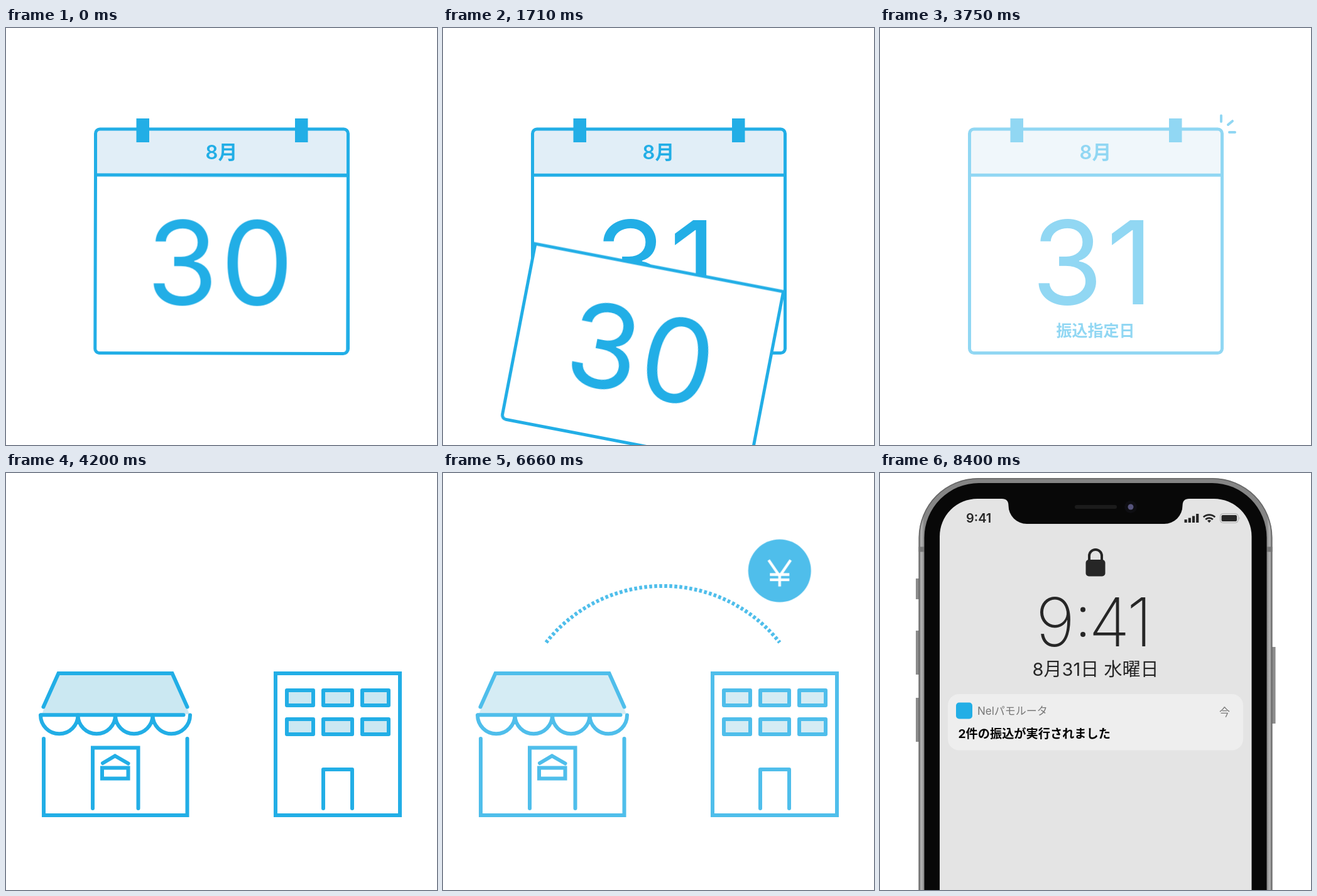
These frames come from a looping animation (686x664 px, 9.9 s). An HTML page:

```html
<!DOCTYPE html>
<html lang="ja">
<head>
<meta charset="utf-8">
<title>振込</title>
<style>
html, body { margin: 0; width: 100%; height: 100%; overflow: hidden; background: #fff; }
svg { display: block; width: 686px; height: 664px; }
text { font-family: Inter, "Noto Sans CJK JP", "Noto Sans CJK", sans-serif; }
.mid { text-anchor: middle; }
.blue { fill: #22aee6; }
.line { fill: none; stroke: #22aee6; stroke-width: 5; }
.thick { stroke-width: 6; stroke-linecap: round; }
.round { stroke-linejoin: round; }
.tint { fill: #cbe8f2; }
.day { font-size: 184px; }
.ink { fill: #262626; }
.note { fill: #777; font-size: 17px; }

/* one shared clock: 1% = 99 ms */
.anim { animation: 9.9s linear infinite; }
#calendar { animation-name: calendar; }
#due { animation-name: due; }
#fall { animation-name: fall; }
#swing { animation-name: swing; transform-origin: 142.5px 234px; }
#town { animation-name: town; }
#trail { animation-name: trail; }
#orbit { animation-name: orbit; transform-origin: 349.5px 442.5px; }
#coin { animation-name: upright; transform-origin: 349.5px 100.5px; }
#phone { animation-name: phone; }
#card { animation-name: card; }

@keyframes calendar {
  0%, 33.333% { opacity: 1; }
  42.424%, 100% { opacity: 0; }
}
@keyframes due {
  0%, 24.242% { opacity: 0; }
  25.758%, 100% { opacity: 1; }
}
@keyframes fall {
  0% { transform: translateY(0); }
  12.121% { transform: translateY(0); animation-timing-function: cubic-bezier(.333, 0, .667, .333); }
  22.424%, 100% { transform: translateY(437px); }
}
@keyframes swing {
  0% { transform: translateX(0) rotate(.15deg); }
  7.576% { transform: translateX(0) rotate(.15deg); animation-timing-function: ease-in-out; }
  9.091% { transform: translateX(4px) rotate(-.8deg); animation-timing-function: cubic-bezier(.4, 0, .6, .75); }
  12.727% { transform: translateX(4.5px) rotate(6.6deg); animation-timing-function: cubic-bezier(.33, .46, .67, .72); }
  18.03% { transform: translateX(4.5px) rotate(11.5deg); }
  20.909% { transform: translateX(4px) rotate(13.4deg); }
  22.424%, 100% { transform: translateX(4px) rotate(14.2deg); }
}
@keyframes town {
  0%, 39.394% { opacity: 0; }
  42.424%, 66.667% { opacity: 1; }
  69.697%, 100% { opacity: 0; }
}
@keyframes trail {
  0%, 48.181% { stroke-dashoffset: 100; }
  48.182%, 52.121% { stroke-dashoffset: 99.5; }
  60.303%, 100% { stroke-dashoffset: 0; }
}
@keyframes orbit {
  0%, 52.423% { transform: rotate(-33deg); opacity: 0; }
  52.424%, 52.727% { transform: rotate(-33deg); opacity: 1; }
  60.606%, 100% { transform: rotate(33deg); opacity: 1; }
}
@keyframes upright {
  0%, 52.727% { transform: rotate(33deg); }
  60.606%, 100% { transform: rotate(-33deg); }
}
@keyframes phone {
  0% { opacity: 0; }
  73.03% { opacity: 0; animation-timing-function: cubic-bezier(.333, .667, .667, 1); }
  78.788%, 100% { opacity: 1; }
}
@keyframes card {
  0%, 81.515% { opacity: 0; }
  84.848%, 100% { opacity: 1; }
}
</style>
</head>
<body>
<svg viewBox="0 0 686 664">
  <defs>
    <path id="arc" d="M164 270A237 237 0 0 1 536 270" pathLength="100"/>
    <mask id="reveal" maskUnits="userSpaceOnUse" x="0" y="0" width="686" height="664">
      <path id="trail" class="anim" d="M164 270A237 237 0 0 1 536 270" pathLength="100"
        fill="none" stroke="#fff" stroke-width="14" stroke-dasharray="100 200"/>
    </mask>
    <rect id="window" x="447" y="346" width="42" height="24"/>
    <rect id="wide" x="505" y="346" width="46" height="24"/>
    <linearGradient id="metal">
      <stop offset="0" stop-color="#777"/>
      <stop offset=".008" stop-color="#b4b4b4"/>
      <stop offset=".016" stop-color="#858585"/>
      <stop offset=".984" stop-color="#858585"/>
      <stop offset=".992" stop-color="#b4b4b4"/>
      <stop offset="1" stop-color="#777"/>
    </linearGradient>
  </defs>

  <g id="calendar" class="anim">
    <rect x="142.5" y="161" width="402" height="356.5" rx="7" fill="#fff"/>
    <path d="M142.5 234V168a7 7 0 0 1 7-7H537.500a7 7 0 0 1 7 7V234Z" fill="#e1eef7"/>
    <rect class="line" x="142.500" y="161" width="402" height="356.5" rx="7"/>
    <path class="line" d="M142.500 234.200H544.500"/>
    <path class="blue" d="M207.500 144h20.500v38h-20.500zM460 144h20.500v38h-20.500z"/>
    <text class="blue mid" x="343" y="209" font-size="31" font-weight="600">8月</text>
    <text class="blue mid day" x="298 398" y="440">31</text>
    <g id="due" class="anim">
      <text class="blue mid" x="343" y="491" font-size="25" font-weight="600">振込指定日</text>
      <path class="line" style="stroke-width:4;stroke-linecap:round"
        d="M543 139.500V149M554 154L561 148.200M556 166H565"/>
    </g>
    <g id="fall" class="anim">
      <g id="swing" class="anim">
        <path class="line" style="fill:#fff" d="M142.500 234H544.500V510.500a7 7 0 0 1-7 7H149.500a7 7 0 0 1-7-7Z"/>
        <text class="blue mid day" x="281 400" y="440">30</text>
      </g>
    </g>
  </g>

  <g id="town" class="anim">
    <g id="shop">
      <path class="tint" d="M83 319H265L292 384H57Z"/>
      <path class="line thick" d="M59.500 372.500L83.500 319H264.500L288.500 372.500"/>
      <path class="line thick" d="M56 385.200H282.500"/>
      <path class="line thick round" d="M55 385.500a29.750 29.750 0 0 0 59.500 0a29.750 29.750 0 0 0 59.500 0a29.750 29.750 0 0 0 59.500 0a29.750 29.750 0 0 0 59.500 0"/>
      <path class="line thick" d="M60 423V545H288.500V423"/>
      <path class="line thick" d="M138 534V437.500H210.500V534"/>
      <path class="line thick" d="M154 462L173.500 450.500L194.500 462.500"/>
      <rect class="line thick" x="153" y="469.500" width="41.500" height="17"/>
    </g>
    <g id="office">
      <rect class="line thick" x="429" y="319" width="198" height="226"/>
      <g class="line thick round" style="fill:#cbe8f2">
        <use href="#window"/><use href="#wide"/><use href="#window" x="120"/>
        <use href="#window" y="46"/><use href="#wide" y="46"/><use href="#window" x="120" y="46"/>
      </g>
      <path class="line thick round" d="M505 534V472H551V534"/>
    </g>
    <g mask="url(#reveal)">
      <path class="line" style="stroke-width:6;stroke-dasharray:4.600 3.400" d="M164 270A237 237 0 0 1 536 270"/>
    </g>
    <g id="orbit" class="anim">
      <g id="coin" class="anim">
        <circle class="blue" cx="349.500" cy="100.500" r="50"/>
        <path transform="translate(349.500 100.500)" fill="none" stroke="#fff" stroke-width="4.300"
          d="M-17.500-17L0 8.500L17.500-17M0 8V25M-15.500 6H15.500M-15.500 14.300H15.500"/>
      </g>
    </g>
  </g>

  <g id="phone" class="anim">
    <path id="buttons" fill="#8c8c8c" d="M57 168h6v33h-6zM57 251h6v70h-6zM57 358h6v70h-6zM623 277h6.500v122h-6.500z"/>
    <rect x="61.500" y="8" width="563" height="900" rx="95" fill="url(#metal)"/>
    <rect x="62.500" y="9" width="561" height="900" rx="94" fill="none" stroke="#666" stroke-width="1.500"/>
    <path fill="#777" d="M61.500 117.500h10v8h-10zM614.500 117.500h10v8h-10z"/>
    <rect x="70.500" y="16" width="545" height="900" rx="87" fill="#080808"/>
    <path fill="#e4e4e4" d="M95 700V101a60 60 0 0 1 60-60H194q10.500 0 10.500 11a29 29 0 0 0 29 29H452.500a29 29 0 0 0 29-29q0-11 10.500-11H531.500a60 60 0 0 1 60 60V700Z"/>
    <rect x="310" y="51" width="67" height="6" rx="3" fill="#1b1b1b"/>
    <circle cx="399" cy="54" r="10" fill="#0e0e12"/>
    <circle cx="399" cy="54" r="4.500" fill="#56547c"/>

    <text class="ink" x="137" y="79" font-size="20" font-weight="600">9:41</text>
    <path class="ink" d="M484.500 74h4.200v5h-4.200zM490.700 71.500h4.200v7.500h-4.200zM496.900 68.500h4.200v10.500h-4.200zM503.100 65h4.200v14h-4.200z"/>
    <g fill="none" stroke="#262626" stroke-width="2.800">
      <path d="M514.800 70.300a13.300 13.300 0 0 1 18.400 0M518.200 74a8.300 8.300 0 0 1 11.600 0"/>
    </g>
    <path class="ink" d="M524 79.300l-3-3.200a4.500 4.500 0 0 1 6 0z"/>
    <rect x="541.500" y="64.800" width="28.500" height="14.400" rx="4" fill="none" stroke="#aaa"/>
    <rect class="ink" x="543.500" y="67" width="24.500" height="10" rx="2"/>
    <path fill="#aaa" d="M571.500 69.500q2 2.500 0 5z"/>

    <rect class="ink" x="327.500" y="138" width="31" height="26.500" rx="5"/>
    <path d="M333 140V132a10 10 0 0 1 20 0V140" fill="none" stroke="#262626" stroke-width="4"/>
    <text class="ink mid" x="279 365 413" y="276" font-size="107" font-weight="200">941</text>
    <circle class="ink" cx="323" cy="217.500" r="4"/>
    <circle class="ink" cx="323" cy="257" r="4"/>
    <text class="ink mid" x="343" y="323" font-size="29">8月31日 水曜日</text>

    <g id="card" class="anim">
      <rect x="108" y="352" width="470" height="89.500" rx="18" fill="#eee"/>
      <rect class="blue" x="121" y="365.500" width="26" height="26" rx="5"/>
      <text class="note" x="155" y="385">Nelパモルータ</text>
      <text class="note" x="540" y="387">今</text>
      <text x="124.500" y="421.500" font-size="19.200" font-weight="700">2件の振込が実行されました</text>
    </g>
  </g>
</svg>
</body>
</html>
```
